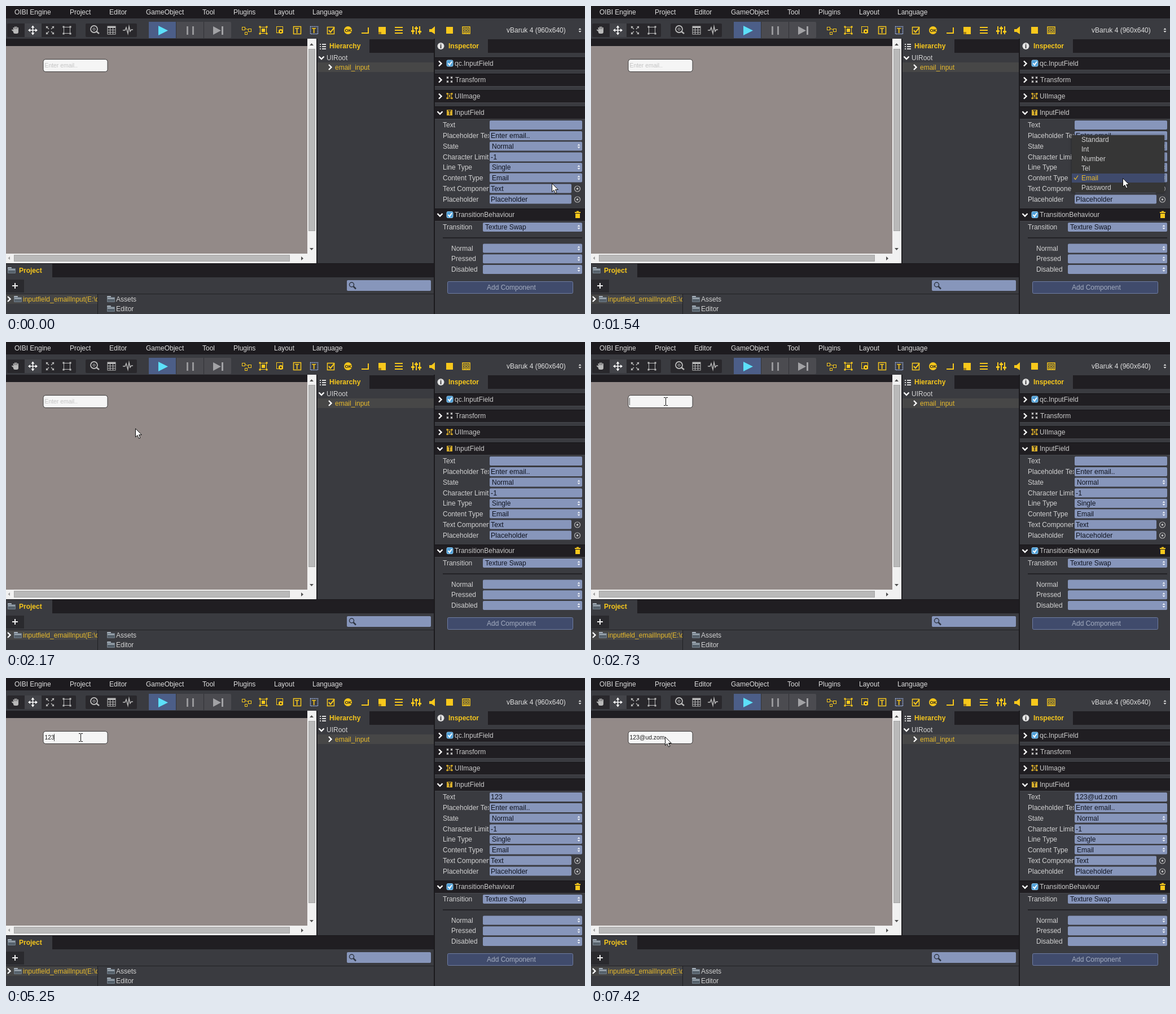
Write an HTML page with a canvas that moves like this. It is 1026 px wide and 546 px high and loops after 8000 ms.

```html
<!DOCTYPE html>
<html lang="en">
<head>
<meta charset="utf-8">
<title>Input field editor</title>
<style>
html, body { margin: 0; width: 100%; height: 100%; overflow: hidden; background: #3a3b40; }
canvas { display: block; }
</style>
</head>
<body>
<canvas id="stage" width="1026" height="546"></canvas>
<script>
const W = 1026, H = 546, LOOP = 8000;
const SANS = '"Liberation Sans", Arial, sans-serif';
const PANEL = '#3a3b40', DARK = '#201e22', FIELD = '#8796bb', GOLD = '#f8c81c', LIGHT = '#d2d2d2', INK = '#101420';
const EMAIL = '123@ud.zom';

const screen = document.getElementById('stage').getContext('2d');
const base = document.createElement('canvas');
base.width = W;
base.height = H;
let g = base.getContext('2d');

function box(x, y, w, h, color) {
  g.fillStyle = color;
  g.fillRect(x, y, w, h);
}

function round(x, y, w, h, r, fill, stroke) {
  g.beginPath();
  g.roundRect(x, y, w, h, r);
  if (fill) { g.fillStyle = fill; g.fill(); }
  if (stroke) { g.strokeStyle = stroke; g.lineWidth = 1; g.stroke(); }
}

function text(s, x, y, color = LIGHT, size = 12, weight = '') {
  g.font = `${weight} ${size}px ${SANS}`;
  g.fillStyle = color;
  g.fillText(s, x, y);
}

function clipped(s, x, y, right, color) {
  g.save();
  g.beginPath();
  g.rect(x, y - 14, right - x, 20);
  g.clip();
  text(s, x, y, color);
  g.restore();
}

function trace(points) {
  g.beginPath();
  for (let i = 0; i < points.length; i += 2) g.lineTo(points[i], points[i + 1]);
}

function poly(points, color) {
  trace(points);
  g.closePath();
  g.fillStyle = color;
  g.fill();
}

function line(points, color, width = 1) {
  trace(points);
  g.strokeStyle = color;
  g.lineWidth = width;
  g.stroke();
}

function frame(x, y, w, h, color, width = 1) {
  g.strokeStyle = color;
  g.lineWidth = width;
  g.strokeRect(x, y, w, h);
}

function ring(x, y, r, color, width = 1) {
  g.beginPath();
  g.arc(x, y, r, 0, 7);
  g.strokeStyle = color;
  g.lineWidth = width;
  g.stroke();
}

function disc(x, y, r, color) {
  g.beginPath();
  g.arc(x, y, r, 0, 7);
  g.fillStyle = color;
  g.fill();
}

function chevron(x, y, open) {
  line(open ? [x - 4.5, y - 2, x, y + 2.5, x + 4.5, y - 2] : [x - 2, y - 4.5, x + 2.5, y, x - 2, y + 4.5], '#fff', 2.4);
}

function spinner(x, y, color = '#eef1f8') {
  poly([x - 2.5, y - 1, x, y - 4, x + 2.5, y - 1], color);
  poly([x - 2.5, y + 1, x, y + 4, x + 2.5, y + 1], color);
}

function folder(x, y) {
  round(x, y, 7, 5, 1, '#a9b3bd');
  round(x, y + 2, 14, 9, 1, '#737f8a');
  box(x + 1, y + 4, 12, 1, '#b6bec5');
  box(x + 1, y + 6, 12, 4, '#56616b');
}

function checkbox(x, y) {
  round(x, y, 11, 11, 2, '#4f9fd8', '#8ecbf0');
  line([x + 2.5, y + 5.5, x + 5, y + 8.5, x + 9, y + 2.5], '#fff', 2);
}

function handles(x, y, r, color) {
  frame(x - r + .5, y - r + .5, 2 * r - 1, 2 * r - 1, color);
  for (const sx of [-1, 1]) for (const sy of [-1, 1]) box(x + sx * r - 1.5, y + sy * r - 1.5, 3, 3, color);
}

function cornerArrows(x, y, r, color) {
  for (const sx of [-1, 1]) for (const sy of [-1, 1]) {
    line([x + sx * 2, y + sy * 2, x + sx * r, y + sy * r], color, 1.3);
    poly([x + sx * r, y + sy * r, x + sx * (r - 4), y + sy * r, x + sx * r, y + sy * (r - 4)], color);
  }
}

function tab(x, y, w, right, label, labelX) {
  box(x, y, right - x, 24, DARK);
  box(x, y, w, 25, PANEL);
  text(label, labelX, y + 16, GOLD, 12, 'bold');
}

function drawMenu() {
  box(0, 0, W, 22, '#1d1b1f');
  const items = { 'OIBI Engine': 15, Project: 113, Editor: 183, GameObject: 248, Tool: 348, Plugins: 403, Layout: 475, Language: 543 };
  for (const name in items) text(name, items[name], 15, '#dedede');
}

function drawTools() {
  const c = '#b9b9b9';
  round(2, 31, 122, 24, 2, '#29282c');
  round(33, 31, 30, 24, 0, '#434449');
  round(141, 31, 91, 24, 2, '#29282c');

  round(13, 41, 9, 8, 3, c);
  for (let i = 0; i < 4; i++) line([14 + i * 2.4, 43, 13.5 + i * 2.5, i % 3 ? 36.5 : 38], c, 1.8);
  line([14, 45, 10.5, 42], c, 2);

  line([40, 43, 55, 43], '#fff', 1.5);
  line([47.5, 35.5, 47.5, 50.5], '#fff', 1.5);
  poly([39, 43, 43, 40, 43, 46], '#fff');
  poly([56, 43, 52, 40, 52, 46], '#fff');
  poly([47.5, 34.5, 44.5, 38.5, 50.5, 38.5], '#fff');
  poly([47.5, 51.5, 44.5, 47.5, 50.5, 47.5], '#fff');
  cornerArrows(78, 43, 7, c);
  handles(108, 43, 6, c);

  ring(156, 41, 6, c, 1.8);
  ring(156, 41, 2, c);
  line([160, 45, 165, 49], c, 2.5);
  frame(180, 36, 14, 14, c);
  box(180, 36, 14, 3, c);
  for (const x of [184.5, 189.5]) line([x, 38, x, 50], c);
  for (const y of [42.5, 46.5]) line([180, y, 194, y], c);
  line([207, 43, 211, 43, 213, 38, 216, 49, 218, 36, 220, 45, 222, 42, 225, 42], c, 1.4);

  round(253, 28, 146, 29, 2, '#4b4b50');
  box(253, 28, 48, 29, '#4c5e88');
  box(301, 28, 1, 29, '#333338');
  box(350, 28, 1, 29, '#333338');
  poly([270, 35, 287, 43.5, 270, 52], '#5ce0fa');
  box(320, 36, 3, 15, '#97979a');
  box(330, 36, 3, 15, '#97979a');
  poly([367, 36, 381, 43.5, 367, 51], '#a2a2a5');
  box(382, 36, 3, 15, '#a2a2a5');
}

function drawWidgets() {
  frame(418.5, 37.5, 5, 5, GOLD);
  frame(429.5, 40.5, 5, 5, GOLD);
  frame(423.5, 46.5, 4, 4, GOLD);
  line([424, 40, 429, 42], GOLD);
  handles(456, 43, 6, GOLD);
  box(453, 40, 6, 6, GOLD);
  frame(479.5, 36.5, 11, 11, GOLD);
  disc(487, 45, 4, GOLD);
  disc(487, 45, 1.5, DARK);
  frame(509.5, 36.5, 13, 13, GOLD, 1.5);
  text('T', 512, 47.5, GOLD, 12, 'bold');
  g.setLineDash([2, 1]);
  frame(539.5, 36.5, 13, 13, '#9bb0dd', 1.5);
  g.setLineDash([]);
  text('T', 542, 47.5, GOLD, 12, 'bold');
  frame(569.5, 37.5, 12, 12, GOLD, 1.5);
  line([572, 43, 575, 46.5, 582, 38], GOLD, 2);
  disc(606, 43, 7, GOLD);
  text('OK', 600.5, 46, DARK, 8, 'bold');
  line([630, 48, 642, 48, 642, 38], GOLD, 2);
  box(660, 37, 13, 13, GOLD);
  box(660, 46, 5, 4, '#a68118');
  for (let i = 0; i < 3; i++) {
    box(689, 37 + i * 5, 14, 2, GOLD);
    const x = 720 + i * 6;
    box(x, 36, 2, 14, GOLD);
    box(x - 2, [43, 38, 44][i], 6, 3, GOLD);
  }
  poly([750, 41, 754, 41, 760, 36, 760, 50, 754, 46, 750, 46], GOLD);
  box(780, 37, 12, 12, GOLD);
  frame(809, 37, 13, 12, GOLD, 1.5);
  for (const x of [811, 816]) for (const y of [39, 44]) frame(x + .5, y + .5, 3, 3, GOLD);
  text('vBaruk 4 (960x640)', 887, 47, '#dedede');
  spinner(1017, 43, '#ddd');
}

function drawScene() {
  box(0, 58, 534, 13, DARK);
  box(0, 71, 534, 368, '#938a88');
  box(534, 58, 16, 398, '#f1f1f1');
  box(0, 439, 550, 17, '#f1f1f1');
  box(536, 76, 12, 323, '#b9b9b9');
  box(14, 441, 489, 12, '#b9b9b9');
  frame(536.5, 76.5, 11, 322, '#a5a5a5');
  frame(14.5, 441.5, 488, 11, '#a5a5a5');
  poly([538, 70, 541.5, 66, 545, 70], '#505050');
  poly([538, 429, 541.5, 433, 545, 429], '#505050');
  poly([7, 444, 3.5, 447, 7, 450], '#a0a0a0');
  poly([523, 444, 527, 447.5, 523, 451], '#505050');
  round(66, 94.5, 114, 22, 4, '#f5f5f5', '#3d3b3b');
}

function drawProject() {
  box(0, 456, 758, 2, '#19181b');
  tab(0, 457, 82, 758, 'Project', 23);
  folder(3, 463);
  box(0, 485, 32, 23, '#2a2a2e');
  box(11, 495, 10, 2, '#eee');
  box(15, 491, 2, 10, '#eee');
  round(604, 486, 149, 19, 2, FIELD);
  ring(612.5, 494, 4, '#303744', 1.5);
  line([615.5, 497, 620, 501.5], '#303744', 2.5);
  box(0, 510, 758, 1, '#222125');
  box(0, 511, 162, 17, '#464646');
  box(162, 511, 1, 35, '#202024');
  chevron(5, 519.5);
  folder(14, 514);
  clipped('inputfield_emailInput(E:\\qc', 30, 524, 162, '#e6b92d');
  folder(179, 514);
  text('Assets', 195, 524);
  folder(179, 531);
  text('Editor', 195, 541);
}

function drawHierarchy() {
  box(550, 58, 2, 398, '#1f1e22');
  tab(552, 59, 92, 758, 'Hierarchy', 573);
  for (let i = 0; i < 3; i++) {
    box(556, 67 + i * 4, 2, 2, '#ddd');
    box(560, 67 + i * 4, 7, 2, '#ddd');
  }
  chevron(559, 91.5, true);
  text('UIRoot', 568, 96);
  box(552, 100, 206, 17, '#474747');
  chevron(574, 108.5);
  text('email_input', 583, 113, '#e6b92d');
}

function header(y, label, labelX, open) {
  box(760, y - 11, 266, 22, DARK);
  box(760, y - 11, 266, 1, '#141316');
  box(760, y + 11, 266, 1, '#47484d');
  chevron(769, y, open);
  text(label, labelX, y + 4, '#cacaca');
}

function control(label, y, value, { x = 857, right = 1021, labelX = 774, select } = {}) {
  clipped(label, labelX, Math.round(y + 4), 856);
  round(x, y - 8, right - x, 16, 2, FIELD);
  text(value, x + (select ? 4 : 2), Math.round(y + 4), INK, select ? 12 : 12.4);
  if (select) spinner(1015, y);
}

function drawInspector() {
  box(758, 58, 2, 488, '#1b1a1d');
  tab(760, 59, 94, W, 'Inspector', 784);
  disc(770.5, 71, 6, '#e4e4e4');
  text('i', 769, 75, DARK, 11, 'bold');

  header(102, 'qc.InputField', 795);
  checkbox(781, 96);
  header(131, 'Transform', 796);
  cornerArrows(786, 130.5, 5, '#ccc');
  header(160, 'UIImage', 795);
  handles(786, 159.5, 4, '#d5a92a');
  box(784.5, 158, 3, 3, '#d5a92a');
  header(189, 'InputField', 795, true);
  box(781, 184, 10, 10, '#d8ae2c');
  text('T', 783, 192.5, DARK, 10, 'bold');

  const pick = { select: true }, ref = { right: 1002 };
  control('Text', 211, '');
  control('Placeholder Text', 230, 'Enter email..');
  control('State', 248.5, 'Normal', pick);
  control('Character Limit', 267.5, '-1');
  control('Line Type', 286, 'Single', pick);
  control('Content Type', 304.5, 'Email', pick);
  control('Text Component', 323.5, 'Text', ref);
  control('Placeholder', 342.5, 'Placeholder', ref);
  for (const y of [324, 343]) {
    ring(1012.5, y, 5, '#b5b5b5', 1.2);
    disc(1012.5, y, 1.8, '#c5c5c5');
  }

  header(370, 'TransitionBehaviour', 795, true);
  checkbox(781, 364.5);
  box(1008, 365, 10, 2, GOLD);
  box(1011, 363.5, 4, 2, GOLD);
  box(1009, 368, 8, 8, GOLD);
  control('Transition', 392, 'Texture Swap', { x: 845, select: true });
  box(774, 410, 247, 2, '#222226');
  ['Normal', 'Pressed', 'Disabled'].forEach((name, i) =>
    control(name, 429.5 + i * 18.8, '', { x: 845, labelX: 789, select: true }));
  round(782.5, 488.5, 222, 21, 2, '#404b6c', '#6f7da3');
  text('Add Component', 852, 503, '#a4adc0');
}

function drawPopup(hover) {
  g.save();
  g.shadowColor = 'rgba(0,0,0,.5)';
  g.shadowBlur = 4;
  box(852, 229, 164, 102, '#363636');
  g.restore();
  if (hover) box(852, 297, 164, 16, '#3f4a6c');
  ['Standard', 'Int', 'Number', 'Tel', 'Email', 'Password'].forEach((name, i) =>
    text(name, 869, 241 + Math.round(i * 16.9), i === 4 ? '#e6b92d' : LIGHT));
  line([856, 304.5, 858.5, 307.5, 863, 300.5], '#e6b92d', 1.2);
}

function drawArrow(x, y) {
  g.save();
  g.translate(x + .5, y + .5);
  trace([0, 0, 0, 15, 3.4, 11.8, 6, 17.5, 8.4, 16.5, 6, 11, 10.8, 11]);
  g.closePath();
  g.fillStyle = '#fff';
  g.fill();
  g.strokeStyle = '#111';
  g.lineWidth = 1;
  g.stroke();
  g.restore();
}

function drawBeam(x, y) {
  box(x, y - 6, 1, 13, '#111');
  for (const end of [y - 7, y + 7]) {
    box(x - 3, end, 3, 1, '#111');
    box(x + 1, end, 3, 1, '#111');
  }
}

// Pointer stops: time, x, y
const POINTER = [
  [0, 967, 314], [350, 965, 319], [420, 964, 324], [560, 959, 319], [630, 951, 313],
  [700, 945, 309], [840, 943, 307], [910, 942, 305], [1890, 915, 302], [1960, 800, 282],
  [2030, 560, 238], [2100, 343, 196], [2170, 229, 153], [2240, 188, 133], [2310, 165, 121],
  [2380, 150, 114], [2450, 140, 109], [2520, 134, 106], [2590, 131, 104]
];
const FOCUS = 2730, BLUR = 7420;
const KEYS = [3920, 4130, 4270, 5600, 5880, 6020, 6300, 6580, 6650, 6860];
const SYNCS = [3920, 4130, 4340, 5740, 5880, 6090, 6370, 6650, 6720, 6930];
const BLINK = 490;

const typed = (times, t) => EMAIL.slice(0, times.filter(k => k <= t).length);

function drawInput(t) {
  if (t < FOCUS) {
    text('Enter email..', 68.5, 109, '#c3c3c3', 10.4);
    return;
  }
  const value = typed(KEYS, t);
  text(value, 68.5, 109, '#222', 10.4);
  const last = Math.max(FOCUS, ...KEYS.filter(k => k <= t));
  if (t < BLUR && Math.floor((t - last) / BLINK) % 2 === 0) {
    box(Math.round(68 + g.measureText(value).width), 99, 1, 13, '#555');
  }
}

function render(t) {
  g.drawImage(base, 0, 0);
  drawInput(t);
  text(typed(SYNCS, t), 859, 215, INK, 12.4);
  if (t >= 1050 && t < 1680) drawPopup(t >= 1540);
  if (t >= FOCUS && t < BLUR) drawBeam(132, 105);
  else {
    const [, x, y] = POINTER.findLast(p => p[0] <= t);
    drawArrow(x, y);
  }
}

box(0, 0, W, H, PANEL);
drawMenu();
drawTools();
drawWidgets();
drawScene();
drawProject();
drawHierarchy();
drawInspector();
g = screen;

const start = performance.now();
function tick() {
  render((performance.now() - start) % LOOP);
  requestAnimationFrame(tick);
}
tick();
</script>
</body>
</html>
```
